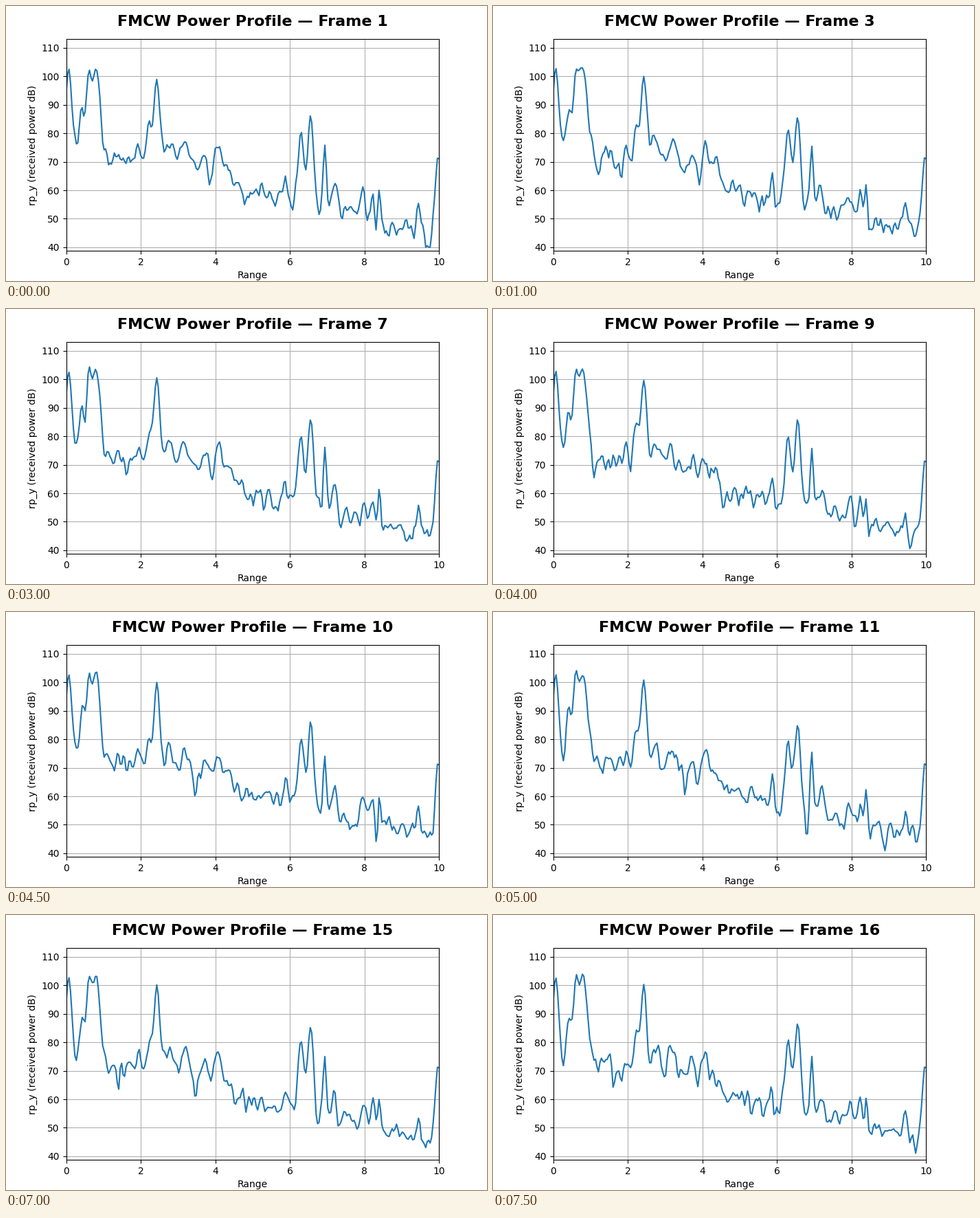
A matplotlib script for the animation above (8000 ms loop, 700 by 400 pixels).

```python
import matplotlib.pyplot as plt
import numpy as np
from matplotlib.animation import FuncAnimation

SWEEPS = 16
BINS = 256
LOW, HIGH = 38.76, 113.1

# Echoes above the clutter: (range, width, height in dB)
ECHOES = [
    (0.07, 0.11, 27), (0.42, 0.08, 14), (0.6, 0.09, 22), (0.8, 0.16, 30),
    (1.95, 0.06, 6), (2.22, 0.09, 13), (2.43, 0.11, 31), (2.75, 0.18, 10),
    (3.2, 0.2, 11), (3.73, 0.13, 9), (4.08, 0.13, 13), (4.35, 0.12, 6),
    (5.88, 0.06, 9), (6.3, 0.11, 24), (6.56, 0.11, 31), (6.94, 0.06, 22),
    (7.2, 0.1, 9), (7.97, 0.1, 7), (8.23, 0.07, 9), (8.4, 0.05, 11),
    (9.45, 0.07, 9), (9.98, 0.11, 28),
]


def bump(x, center, width):
    return np.exp(-((x - center) / width) ** 2)


def sweep_power(rng):
    """One sweep in dB: the mean profile disturbed by smoothed complex noise."""
    z = rng.normal(size=BINS + 2) + 1j * rng.normal(size=BINS + 2)
    z = np.convolve(z, [0.5, 1, 0.5], mode="valid") / np.sqrt(3)
    gain = np.maximum(np.abs(1 + sway * z), 0.4)
    return np.clip(clutter + echo + 20 * np.log10(gain), 40, 112)


x = np.linspace(0, 10, BINS)
clutter = 76 - 3.2 * x
echo = sum(h * bump(x, c, w) for c, w, h in ECHOES)
# Strong echoes are steadier, and both ends stay almost still
sway = 0.36 * 10 ** (-echo / 60) * (1 - bump(x, 0, 0.2) - bump(x, 10, 0.15))

rng = np.random.default_rng(7)
sweeps = [sweep_power(rng) for _ in range(SWEEPS)]

fig, ax = plt.subplots(figsize=(7, 4), dpi=100)
line, = ax.plot(x, sweeps[0], color="#1f77b4", lw=1.5)
ax.set(xlim=(0, 10), ylim=(LOW, HIGH), xlabel="Range",
       ylabel="rp_y (received power dB)")
ax.grid(True)
title = ax.set_title("", fontsize=16, fontweight="bold", pad=14)


def update(i):
    line.set_ydata(sweeps[i])
    title.set_text(f"FMCW Power Profile — Frame {i + 1}")
    return line, title


anim = FuncAnimation(fig, update, frames=SWEEPS, interval=500, repeat=True,
                     repeat_delay=0)
plt.show()
```
